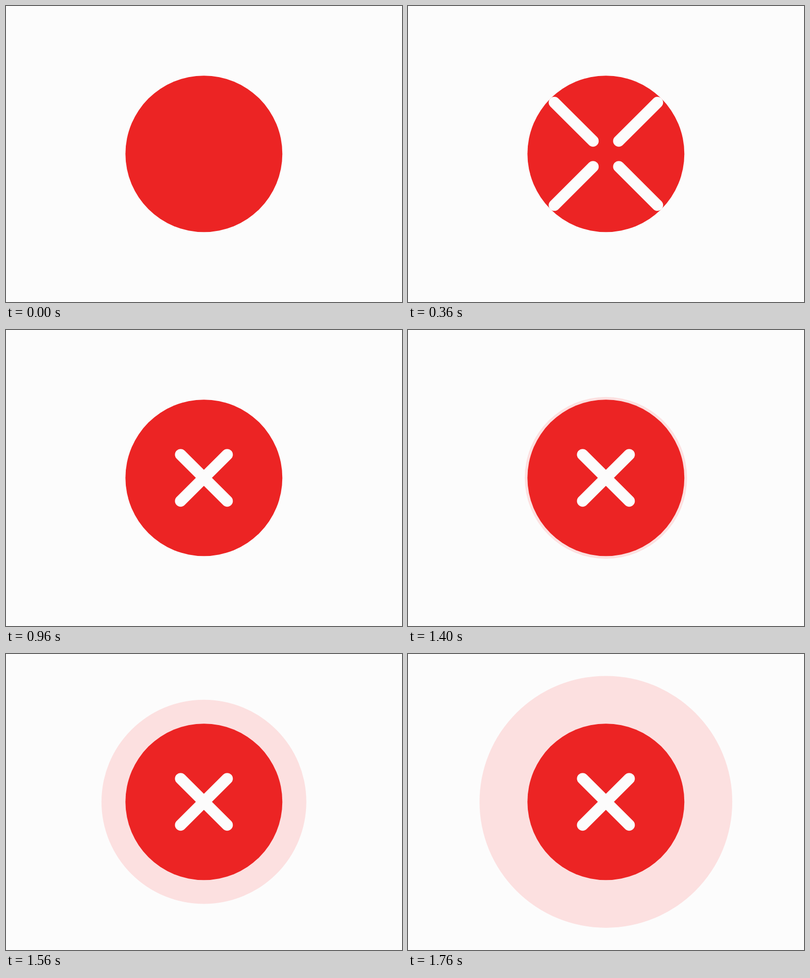
Animation, 800 px wide and 600 px high, one loop 2.4 s. Source, as an HTML page:

```html
<!DOCTYPE html>
<html lang="en">
<head>
<meta charset="utf-8">
<title>Error badge</title>
<style>
  html, body { margin: 0; width: 100%; height: 100%; overflow: hidden; background: #fcfcfc; }
  svg { display: block; width: 100%; height: 100%; }
</style>
</head>
<body>
<svg viewBox="0 0 800 600">
  <g transform="translate(399.8 299.7)">
    <circle id="ring" r="158.5" fill="#fce0e0"/>
    <circle r="158.5" fill="#ec2424"/>
    <path id="cross" fill="none" stroke="#fcfcfc" stroke-width="23" stroke-linecap="round"/>
  </g>
</svg>
<script>
  const LOOP = 2400, STEP = 40;
  const RADIUS = 158.5, RING_MAX = 255.3;
  const EDGE = 104.1, ARM = 47;
  const ring = document.getElementById('ring');
  const cross = document.getElementById('cross');

  const span = (t, from, to) => Math.min(1, Math.max(0, (t - from) / (to - from)));
  const mix = (a, b, p) => a + (b - a) * p;

  // cubic-bezier(1/6, 0, 5/6, 1), solved by bisection
  function ease(x) {
    if (x <= 0 || x >= 1) return x;
    let lo = 0, hi = 1;
    for (let i = 0; i < 24; i++) {
      const s = (lo + hi) / 2, r = 1 - s;
      if (0.5 * s * r * r + 2.5 * s * s * r + s ** 3 < x) lo = s;
      else hi = s;
    }
    return lo * lo * (3 - 2 * lo);
  }

  function arms(inner, outer) {
    return [[-1, -1], [1, -1], [1, 1], [-1, 1]]
      .map(([x, y]) => `M${x * outer} ${y * outer}L${x * inner} ${y * inner}`)
      .join('');
  }

  function draw(t) {
    // arms grow inwards from the rim, then their outer ends pull in
    const inner = mix(EDGE, 0, span(t, 0, 480));
    const outer = mix(EDGE, ARM, span(t, 480, 960));
    cross.setAttribute('d', t > 0 ? arms(inner, outer) : '');

    const grow = ease(span(t, 1360, 1760));
    ring.setAttribute('r', mix(RADIUS, RING_MAX, grow));
    ring.setAttribute('visibility', grow > 0 ? 'visible' : 'hidden');
  }

  const start = performance.now();
  function tick() {
    const t = (performance.now() - start) % LOOP;
    draw(Math.floor(t / STEP) * STEP);
    requestAnimationFrame(tick);
  }
  tick();
</script>
</body>
</html>
```
